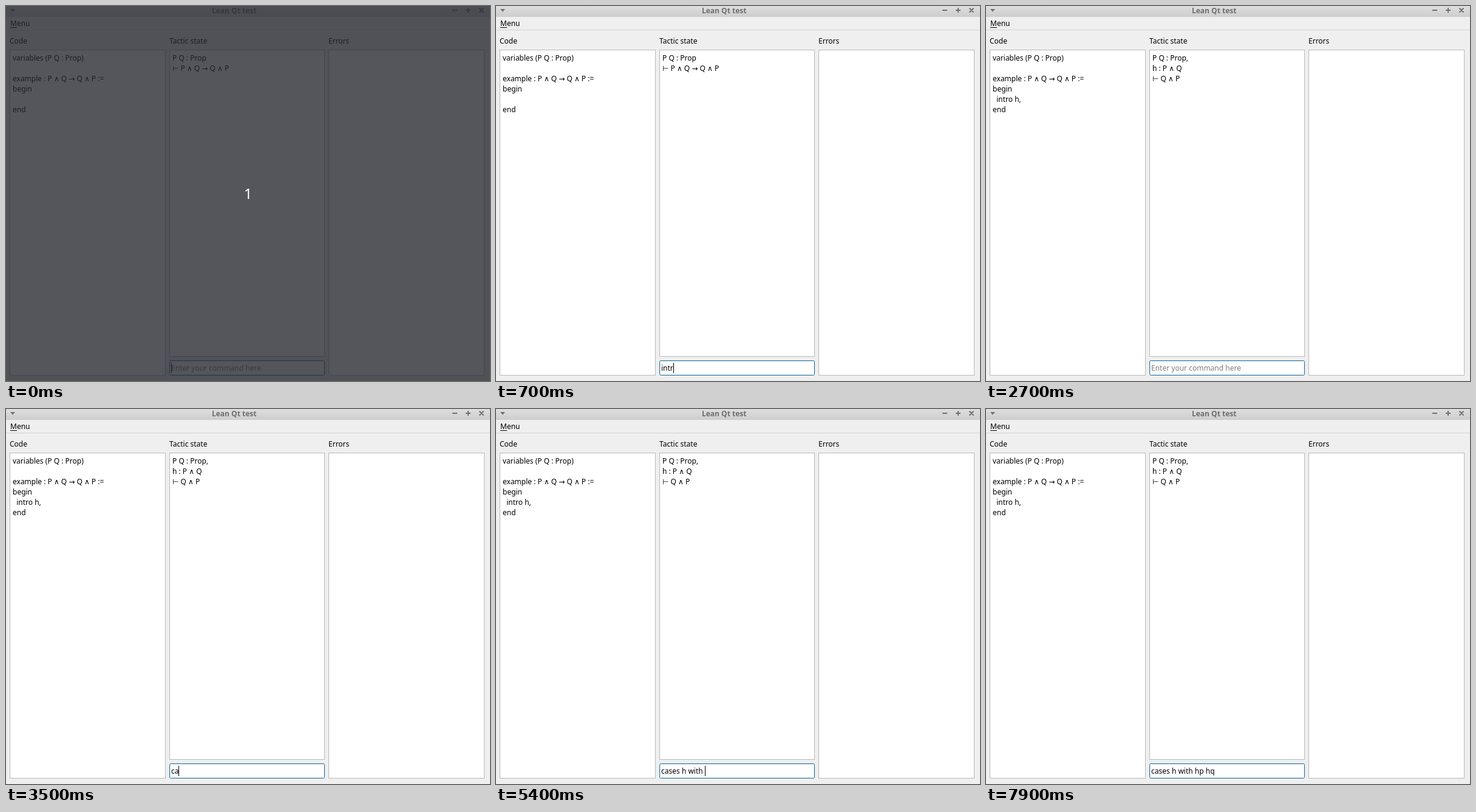
Write an HTML page that moves like this. It is 797x618 px and loops after 8 s.

```html
<!DOCTYPE html>
<html lang="en">
<head>
<meta charset="utf-8">
<title>Lean Qt test</title>
<style>
  html, body { margin: 0; width: 100%; height: 100%; overflow: hidden; background: #efefef; }
  svg { display: block; }
  text { font: 12px "Noto Sans", "DejaVu Sans", sans-serif; white-space: pre; }
  .box { fill: #fff; stroke: #b9b9b9; }
  .title { font-weight: bold; fill: #6e6e6e; }
  .count { font-size: 24px; fill: #fff; text-anchor: middle; }
</style>
</head>
<body>
<svg width="797" height="618" viewBox="0 0 797 618">
  <defs>
    <linearGradient id="bar" x2="0" y2="1">
      <stop stop-color="#dedede"/>
      <stop offset="1" stop-color="#cdcdcd"/>
    </linearGradient>
  </defs>
  <rect width="797" height="618" fill="#efefef"/>

  <rect width="797" height="18" fill="url(#bar)"/>
  <text class="title" x="339" y="12">Lean Qt test</text>
  <path d="M7 5h8l-4 4.5z" fill="#6e6e6e"/>
  <path d="M735 7h8M757 7h8M761 3v8M779.5 3.5l7 7M786.5 3.5l-7 7" stroke="#707070" stroke-width="2"/>

  <text x="7" y="33">Menu</text>
  <path d="M7 35.5h11" stroke="#000"/>
  <path d="M0 39.5h797" stroke="#d3d3d3"/>

  <text x="6" y="62">Code</text>
  <text x="269" y="62">Tactic state</text>
  <text x="531" y="62">Errors</text>
  <rect class="box" x="6.5" y="72.5" width="256" height="536"/>
  <rect class="box" x="269.5" y="72.5" width="255" height="505"/>
  <rect class="box" x="531.5" y="72.5" width="256" height="536"/>
  <g id="code"></g>
  <g id="goal"></g>

  <rect x="269.5" y="584.5" width="255" height="24" rx="2" fill="#fff" stroke="#26709e"/>
  <rect x="270.5" y="585.5" width="253" height="22" rx="1.7" fill="none" stroke="#308cc6" stroke-opacity=".16"/>
  <text id="input" x="272" y="601"></text>
  <rect id="caret" y="588" width="1" height="17"/>

  <g id="shade">
    <rect width="797" height="618" fill="#24272f" fill-opacity=".78"/>
    <text class="count" x="398.5" y="318">1</text>
  </g>
</svg>
<script>
const LOOP = 8000, COMMIT = 2200;
const $ = id => document.getElementById(id);

// [start ms, typed text, caret hidden]
const steps = [
  [0, ""], [100, "", true],
  [400, "i"], [600, "in"], [700, "intr"], [800, "intro"], [1400, "intro "],
  [1600, "intro h"], [2100, "intro h", true],
  [COMMIT, ""], [2700, "", true],
  [3300, "c"], [3500, "ca"], [3700, "cas"], [3900, "case"], [4000, "cases"],
  [4200, "cases "], [4700, "cases h"], [4900, "cases h w"],
  [5100, "cases h wi"], [5200, "cases h wit"], [5300, "cases h with"], [5400, "cases h with "],
  [6100, "cases h with h"], [6400, "cases h with hp"], [6800, "cases h with hp "],
  [7000, "cases h with hp h"], [7100, "cases h with hp hq"],
  [7900, "cases h with hp hq", true]
];

function setLines(group, x, lines) {
  group.innerHTML = lines.map((s, i) => `<text x="${x}" y="${90 + 17 * i}">${s}</text>`).join("");
}

function showProof(done) {
  setLines($("code"), 11, ["variables (P Q : Prop)", "", "example : P ∧ Q → Q ∧ P :=",
    "begin", done ? "  intro h," : "", "end"]);
  setLines($("goal"), 274, done ? ["P Q : Prop,", "h : P ∧ Q", "⊢ Q ∧ P"]
                                : ["P Q : Prop", "⊢ P ∧ Q → Q ∧ P"]);
}

function showInput([, typed, hidden]) {
  const input = $("input");
  input.textContent = typed || "Enter your command here";
  input.setAttribute("fill", typed ? "#000" : "#7f7f7f");
  const width = typed ? input.getComputedTextLength() : 0;
  $("caret").setAttribute("x", Math.round(271.8 + width));
  $("caret").style.display = hidden ? "none" : "";
}

let shown, start;
function draw(now) {
  start ??= now;
  const t = (now - start) % LOOP;
  const step = steps.findLast(s => s[0] <= t);
  if (step !== shown) {
    shown = step;
    showProof(t >= COMMIT);
    showInput(step);
    $("shade").style.display = t < 100 ? "" : "none";
  }
  requestAnimationFrame(draw);
}
draw(performance.now());
</script>
</body>
</html>
```
